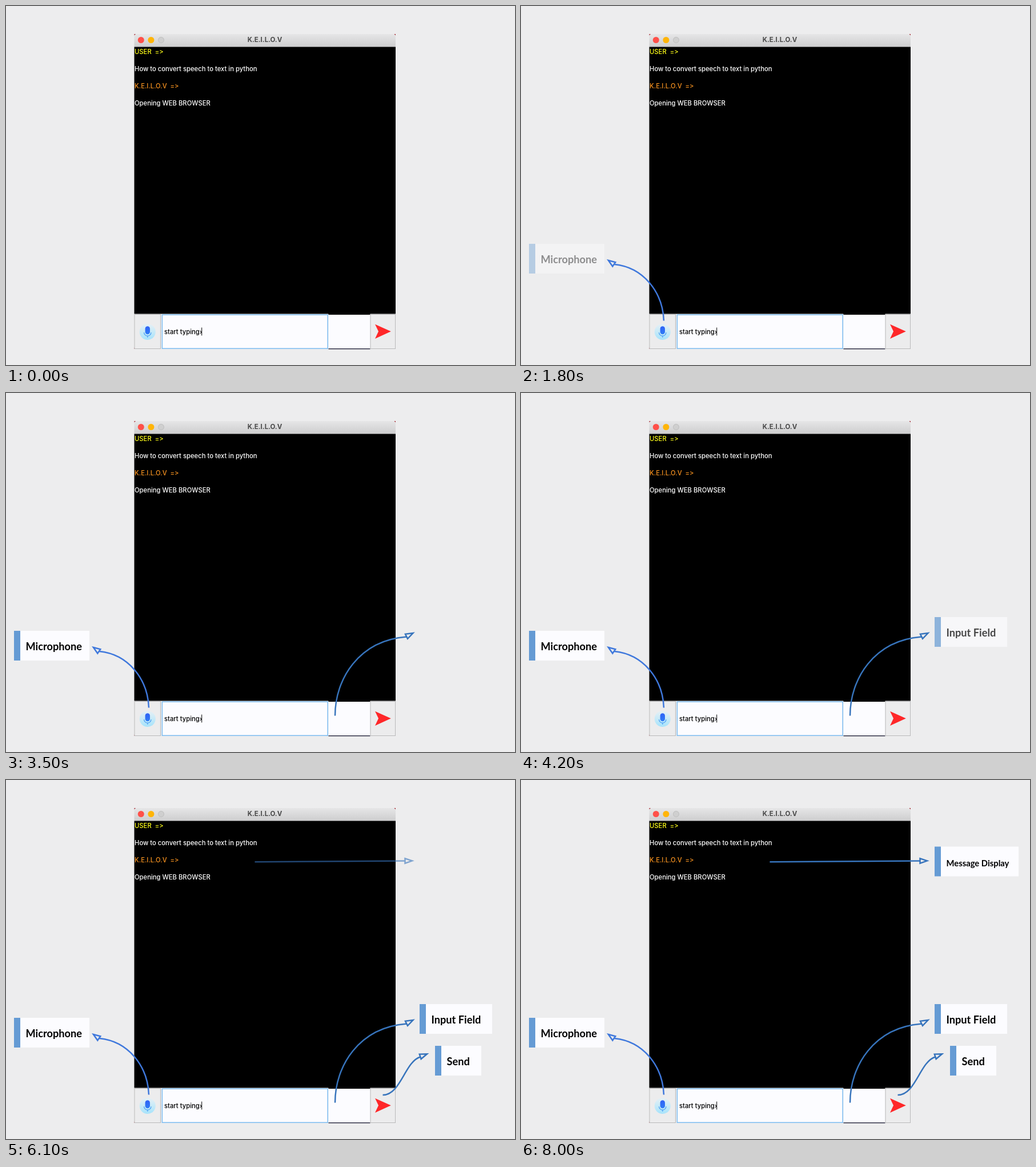
Animation, 891 px wide and 628 px high, one loop 8100 ms. Source, as an HTML page:

```html
<!DOCTYPE html>
<html lang="en">
<head>
<meta charset="utf-8">
<title>Assistant window tour</title>
<style>
html, body { margin: 0; width: 100%; height: 100%; overflow: hidden; background: #ededee; }
svg { display: block; width: 100vw; height: 100vh; }
.ui text {
  font: 500 11.25px Inter, sans-serif;
  font-variant-ligatures: none;
  font-feature-settings: "calt" 0;
  white-space: pre;
}
.ui .title { font-size: 11.5px; font-weight: 700; text-anchor: middle; }
.label text { font: 700 18.2px Lato, sans-serif; fill: #000; }
.label .small { font-size: 14.8px; }
.arrow { fill: none; stroke-width: 2.5; stroke-linejoin: miter; }
.step { opacity: 0; }
</style>
</head>
<body>
<svg viewBox="0 0 891 628">
  <defs>
    <linearGradient id="bar" x1="0" y1="0" x2="0" y2="1">
      <stop offset="0" stop-color="#e6e6e7"/>
      <stop offset="1" stop-color="#cdcdce"/>
    </linearGradient>
    <linearGradient id="disc" x1="0" y1="0" x2="0" y2="1">
      <stop offset="0" stop-color="#e6f0f5"/>
      <stop offset="1" stop-color="#a6e3fb"/>
    </linearGradient>
    <linearGradient id="mic" x1="0" y1="0" x2="0" y2="1">
      <stop offset="0" stop-color="#2f62f6"/>
      <stop offset="1" stop-color="#2f7cf5"/>
    </linearGradient>
  </defs>

  <g class="ui">
    <rect x="224.5" y="49" width="457.5" height="551" fill="#ededee"/>
    <rect x="224.5" y="49" width="457.5" height="22.5" fill="url(#bar)"/>
    <path d="M224.5 49h2.5l-2.5 2.5zM682 49h-2.5l2.5 2.5zM224.5 600h2.5l-2.5-2.5zM682 600h-2.5l2.5-2.5z" fill="#a8323c"/>
    <circle cx="236.3" cy="59.5" r="5.5" fill="#ff5049"/>
    <circle cx="253.9" cy="59.5" r="5.5" fill="#ffb507"/>
    <circle cx="271.5" cy="59.5" r="5" fill="#cfcfcf" stroke="#bebebe"/>
    <text class="title" x="453" y="63" fill="#484848">K.E.I.L.O.V</text>

    <rect x="224.5" y="71.5" width="457.5" height="467" fill="#000"/>
    <text x="225" y="84" fill="#ffff18">USER  =&gt;</text>
    <text x="225" y="114" fill="#fff">How to convert speech to text in python</text>
    <text x="225" y="144" fill="#fa9420">K.E.I.L.O.V  =&gt;</text>
    <text x="225" y="174" fill="#fff">Opening WEB BROWSER</text>

    <rect x="225" y="539.5" width="45.5" height="60" fill="#ececed" stroke="#b9b9ba"/>
    <circle cx="247.8" cy="570" r="14" fill="url(#disc)"/>
    <rect x="243.6" y="560.3" width="8.4" height="14" rx="4.2" fill="url(#mic)"/>
    <path d="M241.6 571a6.2 6.2 0 0 0 12.4 0M247.8 577v3" fill="none" stroke="#4a9cf5" stroke-width="1.2"/>

    <rect x="273.4" y="540.2" width="289.8" height="59" fill="#fcfcff" stroke="#82bff0" stroke-width="1.6"/>
    <text x="277" y="573.5" fill="#000">start typing›</text>
    <path d="M342.7 562.5V576.5" stroke="#000"/>

    <rect x="564.5" y="538" width="73" height="2.2" fill="#000"/>
    <rect x="564.5" y="540.2" width="73" height="59" fill="#fcfcff"/>
    <rect x="564.5" y="599" width="73" height="1.4" fill="#24243c"/>

    <rect x="638" y="539.5" width="43.5" height="60" fill="#ececed" stroke="#b9b9ba"/>
    <path d="M646 556.7L673.8 569.3L646 582L652 569.3Z" fill="#ff2729"/>
  </g>
  <g id="tour"></g>
</svg>
<script>
const LOOP = 8100, TICK = 100, FADE = 1000;
const tour = document.getElementById("tour");
const steps = [];

function step(start, markup) {
  const g = document.createElementNS("http://www.w3.org/2000/svg", "g");
  g.setAttribute("class", "step");
  g.innerHTML = markup;
  tour.append(g);
  steps.push({ g, start });
}

const arrow = (color, line, head) =>
  `<path class="arrow" stroke="${color}" d="${line}"/>
   <path class="arrow" stroke="${color}" stroke-width="2" d="${head}Z"/>`;

const label = (x, y, w, text, size = "") =>
  `<g class="label">
     <rect x="${x}" y="${y}" width="${w}" height="52" fill="#fcfcff"/>
     <rect x="${x}" y="${y}" width="11" height="52" fill="#659bd4"/>
     <text class="${size}" x="${x + 20.5}" y="${y + 34}">${text}</text>
   </g>`;

const blue = "#3774bc";

step(300, arrow("#3f78dc", "M250 550.5C248 500 214 457 163.5 452",
  "M153 445L165.3 448.3L160.3 455.5"));
step(1400, label(14, 416, 132, "Microphone"));
step(2500, arrow(blue, "M576 564.5C576 500 618 433 701 426.5",
  "M712.5 420L699 421.7L703 429.8"));
step(3500, label(724, 392, 127, "Input Field"));
step(4500, arrow(blue, "M659.5 551C691 551 698 493 725 484.5",
  "M737 479.3L723.8 479.6L726.6 488") + label(751, 465, 81, "Send"));
step(5500, arrow(blue, "M435.5 143.3L698.5 141.5",
  "M711 141.4L698.5 137.2L698.5 145.8"));
step(6500, label(724, 116.5, 147, "Message Display", "small"));

const origin = performance.now();

function draw(now) {
  const t = Math.floor((Math.max(0, now - origin) % LOOP) / TICK) * TICK;
  for (const { g, start } of steps) {
    g.style.opacity = Math.min(1, Math.max(0, (t - start) / FADE));
  }
  requestAnimationFrame(draw);
}
draw(origin);
</script>
</body>
</html>
```
